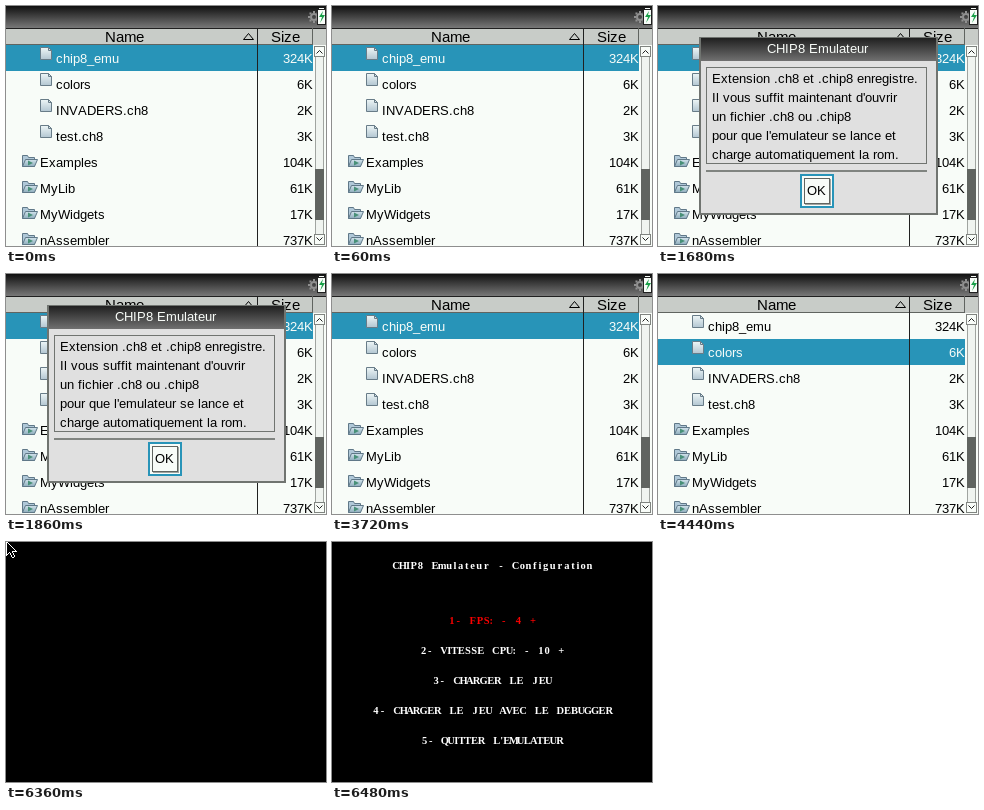
An HTML page with a canvas that plays this animation: 320 by 240 pixels, repeating every 8000 ms.

```html
<!DOCTYPE html>
<html lang="fr">
<meta charset="utf-8">
<title>CHIP8 Emulateur</title>
<style>
  html, body { margin: 0; height: 100%; overflow: hidden; background: #000; }
  canvas { display: block; }
</style>
<canvas width="320" height="240"></canvas>
<script>
const ctx = document.querySelector('canvas').getContext('2d', { alpha: false });
const LOOP = 8000, ROW = 26, LIST_TOP = 39;
const WHITE = '#f8fcf8', BLUE = '#2894b8', PANEL = '#e0e0e0';

const entries = [
  ['chip8_emu', '324K'], ['colors', '6K'], ['INVADERS.ch8', '2K'], ['test.ch8', '3K'],
  ['Examples', '104K', true], ['MyLib', '61K', true], ['MyWidgets', '17K', true], ['nAssembler', '737K', true]
];
const message = [
  'Extension .ch8 et .chip8 enregistre.', "Il vous suffit maintenant d'ouvrir",
  'un fichier .ch8 ou .chip8', "pour que l'emulateur se lance et", 'charge automatiquement la rom.'
];
const menu = [
  ['CHIP8 Emulateur - Configuration', 27], ['1- FPS: - 4 +', 82, '#f80000'],
  ['2- VITESSE CPU: - 10 +', 112], ['3- CHARGER LE JEU', 142],
  ['4- CHARGER LE JEU AVEC LE DEBUGGER', 172], ["5- QUITTER L'EMULATEUR", 202]
];

function rect(x, y, w, h, fill) {
  ctx.fillStyle = fill;
  ctx.fillRect(x, y, w, h);
}

function box(x, y, w, h, border, fill, line = 1) {
  rect(x, y, w, h, border);
  rect(x + line, y + line, w - 2 * line, h - 2 * line, fill);
}

function shade(y, h, top, bottom) {
  const g = ctx.createLinearGradient(0, y, 0, y + h);
  g.addColorStop(0, top);
  g.addColorStop(1, bottom);
  return g;
}

function path(points, fill, stroke, closed = true) {
  ctx.beginPath();
  for (let i = 0; i < points.length; i += 2) ctx.lineTo(points[i], points[i + 1]);
  if (closed) ctx.closePath();
  if (fill) { ctx.fillStyle = fill; ctx.fill(); }
  if (stroke) { ctx.strokeStyle = stroke; ctx.lineWidth = 1; ctx.stroke(); }
}

// Bitmap-style text: every glyph advances by whole pixels
function text(s, x, y, color = '#000', align = 0, size = 13) {
  ctx.font = `${size}px "Liberation Sans", Arial, sans-serif`;
  ctx.textAlign = 'left';
  ctx.fillStyle = color;
  const widths = [...s].map(c => Math.round(ctx.measureText(c).width));
  x -= Math.round(widths.reduce((a, b) => a + b) * align);
  [...s].forEach((c, i) => {
    ctx.fillText(c, x, y);
    x += widths[i];
  });
}

function at(x, y, draw) {
  ctx.save();
  ctx.translate(x, y);
  draw();
  ctx.restore();
}

function fileIcon() {
  path([.5, .5, 8.5, .5, 11.5, 3.5, 11.5, 12.5, .5, 12.5], shade(0, 13, '#f0f8f8', '#b0c4d0'), '#687c88');
  path([8.5, .5, 8.5, 3.5, 11.5, 3.5], '#d8e4e8', '#687c88');
}

function folderIcon() {
  path([.5, 12.5, .5, 1.5, 5.5, 1.5, 6.5, 3.5, 12.5, 3.5, 12.5, 12.5], '#b0c8d8', '#607888');
  path([.5, 12.5, 3.5, 5.5, 15.5, 5.5, 12.5, 12.5], shade(5, 8, '#d8e8f0', '#88a8b8'), '#607888');
  path([6, 6.5, 11, 9, 6, 11.5], '#489078');
}

function statusBar() {
  rect(0, 0, 320, 22, shade(0, 22, '#101010', '#787878'));
  ctx.strokeStyle = '#909090';
  ctx.lineWidth = 2;
  ctx.beginPath();
  ctx.arc(308, 11, 3, 0, 7);
  ctx.stroke();
  for (let i = 0; i < 8; i++) {
    const a = i * Math.PI / 4;
    rect(307 + 5 * Math.cos(a), 10 + 5 * Math.sin(a), 2, 2, '#909090');
  }
  rect(313, 2, 5, 2, WHITE);
  box(311, 3, 9, 16, '#202020', WHITE);
  path([317, 5, 313, 11, 316, 11, 314, 17, 319, 9, 316, 9], '#18a048');
}

function scrollButton(y, dir) {
  box(308, y, 11, 11, '#808480', WHITE);
  path([310.5, y + 5.5 + 2 * dir, 313.5, y + 5.5 - dir, 316.5, y + 5.5 + 2 * dir], null, '#202020', false);
}

function scrollBar() {
  rect(307, LIST_TOP, 13, 201, WHITE);
  box(309, 40, 9, 199, '#a0a4a0', '#f0f4f0');
  rect(309, 163, 9, 51, '#606460');
  scrollButton(40, 1);
  scrollButton(228, -1);
}

function browser(selected) {
  rect(0, 0, 320, 240, WHITE);
  statusBar();
  rect(0, 22, 320, 17, '#c8ccc8');
  rect(0, 22, 320, 1, '#202020');
  rect(0, 38, 307, 1, '#606460');
  text('Name', 119, 36, '#000', .5, 15);
  text('Size', 280, 36, '#000', .5, 15);
  path([237.5, 33.5, 242.5, 27.5, 247.5, 33.5], null, '#000');
  entries.forEach(([name, size, folder], i) => {
    const y = LIST_TOP + i * ROW, color = i === selected ? WHITE : '#000';
    if (i === selected) rect(0, y, 307, ROW, BLUE);
    at(folder ? 16 : 34, y + (folder ? 5 : 2), folder ? folderIcon : fileIcon);
    text(name, folder ? 34 : 50, y + 18, color);
    text(size, 307, y + 18, color, 1);
  });
  rect(251, 22, 1, 218, '#202020');
  rect(306, 22, 1, 17, '#606460');
  scrollBar();
}

function dialog() {
  box(41, 31, 239, 178, '#707470', PANEL, 2);
  rect(43, 32, 235, 23, shade(32, 23, '#202020', '#707070'));
  text('CHIP8 Emulateur', 160, 47, WHITE, .5);
  box(48, 61, 221, 97, '#707470', PANEL);
  message.forEach((line, i) => text(line, 54, 77 + i * 19));
  rect(48, 164, 221, 2, '#808480');
  box(142, 168, 34, 34, BLUE, WHITE, 2);
  rect(147, 173, 26, 26, '#a0a4a0');
  box(146, 172, 26, 26, '#606460', WHITE);
  text('OK', 159, 189, '#000', .5);
}

function cursor() {
  rect(0, 0, 320, 240, '#000');
  const span = (x, y, w) => {
    rect(x - 1, y, w + 2, 1, '#fff');
    if (w > 0) rect(x, y, w, 1, '#000');
  };
  for (let y = 0; y < 9; y++) span(1, y, y);
  rect(0, 9, 11, 1, '#fff');
  rect(1, 9, 5, 1, '#000');
  for (let y = 10; y < 15; y++) {
    span(1, y, 12 - y);
    span(y - 1 >> 1, y, 2);
  }
  rect(6, 15, 2, 1, '#fff');
}

// Advance widths of the console lettering
function glyphWidth(c) {
  if (c === ' ') return 8;
  if ("':".includes(c)) return 3;
  if ('Iil'.includes(c)) return 4.3;
  if (c === 't') return 5.3;
  return 'BCDEFGJLMPR4agmru'.includes(c) ? 7.1 : 6.2;
}

function configMenu() {
  rect(0, 0, 320, 240, '#000');
  for (const [line, y, color = '#fff'] of menu) {
    const widths = [...line].map(glyphWidth);
    let x = 160.5 - widths.reduce((a, b) => a + b) / 2;
    ctx.font = 'bold 10.5px "Liberation Serif", "Times New Roman", serif';
    ctx.textAlign = 'center';
    ctx.fillStyle = color;
    [...line].forEach((c, i) => {
      ctx.fillText(c, x + widths[i] / 2, y);
      x += widths[i];
    });
  }
}

function frame() {
  const t = performance.now() % LOOP;
  if (t >= 6480) configMenu();
  else if (t >= 6360) cursor();
  else {
    browser(t < 4440 ? 0 : t < 4980 ? 1 : 2);
    if (t >= 1680 && t < 3720) dialog();
  }
  requestAnimationFrame(frame);
}
frame();
</script>
</html>
```
